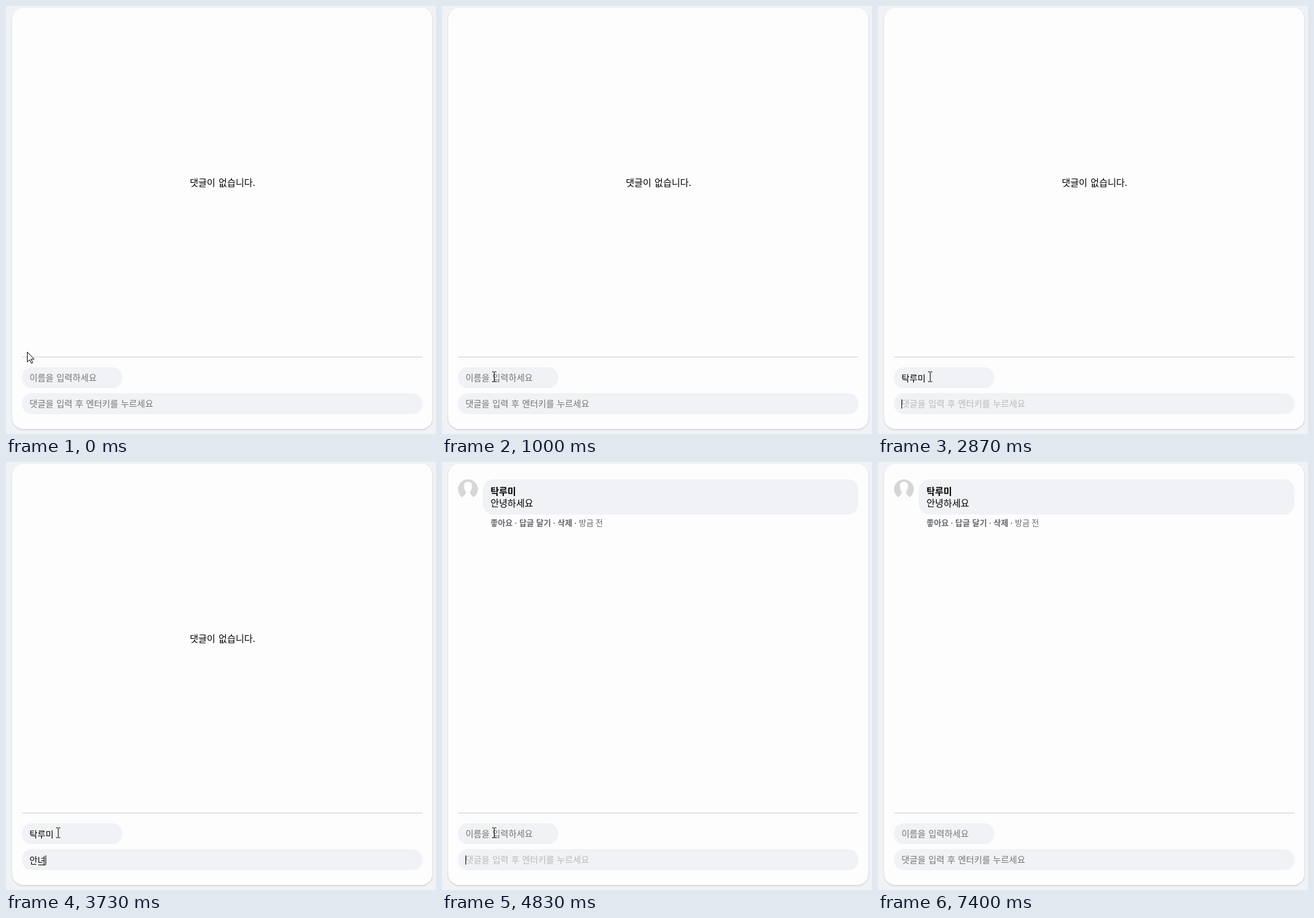
An HTML page for the animation above (7.46 s loop, 696x692 px).

```html
<!DOCTYPE html>
<html lang="ko">
<head>
<meta charset="utf-8">
<style>
  html, body { margin: 0; width: 100%; height: 100%; overflow: hidden; background: #f0f2f5; }
  svg { display: block; width: 696px; height: 692px; font: 15px "Noto Sans CJK KR", "Noto Sans CJK", sans-serif; }
  text { white-space: pre; }
  .card { fill: #fdfdfd; filter: drop-shadow(0 1px 1px #0000002e); }
  .box { fill: #f0f2f5; }
  .field text { font-size: 14.2px; word-spacing: .4px; }
  .hint { fill: #757575; }
  .focus .hint { fill: #b7b9bb; }
  .meta { font-size: 13px; font-weight: bold; fill: #65676b; }
  .plain { font-weight: normal; }
  .bold { font-weight: bold; }
</style>
</head>
<body>
<svg viewBox="0 0 696 692">
  <rect class="card" x="10" y="3" width="680" height="681" rx="18"/>
  <text id="empty" x="297.5" y="291" word-spacing="1">댓글이 없습니다.</text>

  <g id="comment">
    <clipPath id="round"><circle cx="42" cy="44" r="16"/></clipPath>
    <g clip-path="url(#round)">
      <rect x="26" y="28" width="32" height="32" fill="#d5d6d8"/>
      <path fill="#fdfdfd" d="M42 32c5 0 7 3 6.500 8c-.3 4-1.500 6-3 8c0 4 1 5 4 7l3 5H31.500l3-5c3-2 4-3 4-7c-1.500-2-2.700-4-3-8c-.5-5 1.500-8 6.500-8z"/>
    </g>
    <rect class="box" x="66" y="28" width="608" height="57" rx="17"/>
    <text class="bold" id="author" x="78.500" y="52.500"></text>
    <text id="body" x="78.500" y="72"></text>
    <g class="meta">
      <text x="78.500" y="103">좋아요</text>
      <text x="125" y="103">답글 달기</text>
      <text x="187" y="103">삭제</text>
      <text class="plain" x="221.500" y="103" word-spacing="-.5">방금 전</text>
      <circle cx="119.500" cy="99" r="1"/>
      <circle cx="181.500" cy="99" r="1"/>
      <circle cx="216" cy="99" r="1"/>
    </g>
  </g>

  <path d="M26 567.500H674" stroke="#ccced2"/>
  <g class="field" id="nameField"></g>
  <g class="field" id="bodyField"></g>

  <path id="arrow" d="M.5.5v16l3.700-3.500 2.800 5.700 2.300-1-2.800-5.700h5z" fill="#fff" stroke="#000"/>
  <path id="beam" d="M-3 -7.500h3M1 -7.500h3M.5 -7v15M-3 8.500h3M1 8.500h3" fill="none" stroke="#000"/>
</svg>
<script>
const LOOP = 7460, LEFT = 38, ADVANCE = 14.2 * 0.92;
const NAME = '탁루미', BODY = '안녕하세요';
const $ = id => document.getElementById(id);
const show = (el, on) => el.setAttribute('visibility', on ? 'visible' : 'hidden');

// Each entry is [time, text while composing]
const spread = (start, end, steps) =>
  steps.map((s, i) => [start + (end - start) * i / (steps.length - 1), s]);
const nameKeys = spread(1930, 2670, ['ㅌ', '타', '탁', '탁ㄹ', '탁루', '탁룸', NAME]);
const bodyKeys = [
  ...spread(3130, 3800, ['ㅇ', '아', '안', '안ㄴ', '안녀', '안녕']),
  ...spread(3900, 4170, ['안녕ㅎ', '안녕하', '안녕핫', '안녕하세', '안녕하셍', BODY])
];
const typed = (keys, t) => keys.reduce((s, [at, text]) => t >= at ? text : s, '');
const within = (t, a, b) => t >= a && t < b;

function makeField(id, y, width, hint) {
  const g = $(id);
  g.innerHTML = `<rect class="box" x="26" y="${y}" width="${width}" height="34" rx="16"/>
    <text class="hint" x="${LEFT}" y="${y + 22}">${hint}</text>
    <text x="${LEFT}" y="${y + 22.5}"></text>
    <rect y="${y + 25}" width="12" height="1"/>
    <rect y="${y + 10}" width="1" height="15"/>`;
  const [, label, text, line, caret] = g.children;
  return (value, focus, composing, caretOn) => {
    g.classList.toggle('focus', focus);
    show(label, !value);
    text.textContent = value;
    const end = LEFT + value.length * ADVANCE;
    line.setAttribute('x', Math.round(end - ADVANCE) + 1);
    show(line, composing && value);
    caret.setAttribute('x', Math.round(end));
    show(caret, focus && caretOn);
  };
}

const drawName = makeField('nameField', 584, 162, '이름을 입력하세요');
const drawBody = makeField('bodyField', 626, 648, '댓글을 입력 후 엔터키를 누르세요');
$('author').textContent = NAME;
$('body').textContent = BODY;

function drawPointer(t) {
  const p = Math.min(1, Math.max(0, (t - 70) / 300));
  const e = p * p * (3 - 2 * p);
  const drop = Math.max(0, (t - 6480) / 120);
  const x = Math.round(34 + 50 * e);
  const y = Math.round(559 + 40 * e + 69 * drop);
  const overField = within(y, 584, 618) || within(y, 626, 660);
  for (const id of ['arrow', 'beam']) {
    $(id).setAttribute('transform', `translate(${x} ${y})`);
    show($(id), t < 6600 && overField === (id === 'beam'));
  }
}

function frame(now) {
  const t = now % LOOP;
  const sent = t >= 4800;
  show($('empty'), !sent);
  show($('comment'), sent);

  const caretOn = !within(t, 4700, 4800) && !within(t, 5330, 5870) && !within(t, 6400, 6930);
  drawName(sent ? '' : typed(nameKeys, t), within(t, 1730, 2830), t < 2700, caretOn);
  drawBody(sent ? '' : typed(bodyKeys, t), within(t, 2830, 7370), true, caretOn);
  drawPointer(t);
  requestAnimationFrame(frame);
}
requestAnimationFrame(frame);
</script>
</body>
</html>
```
